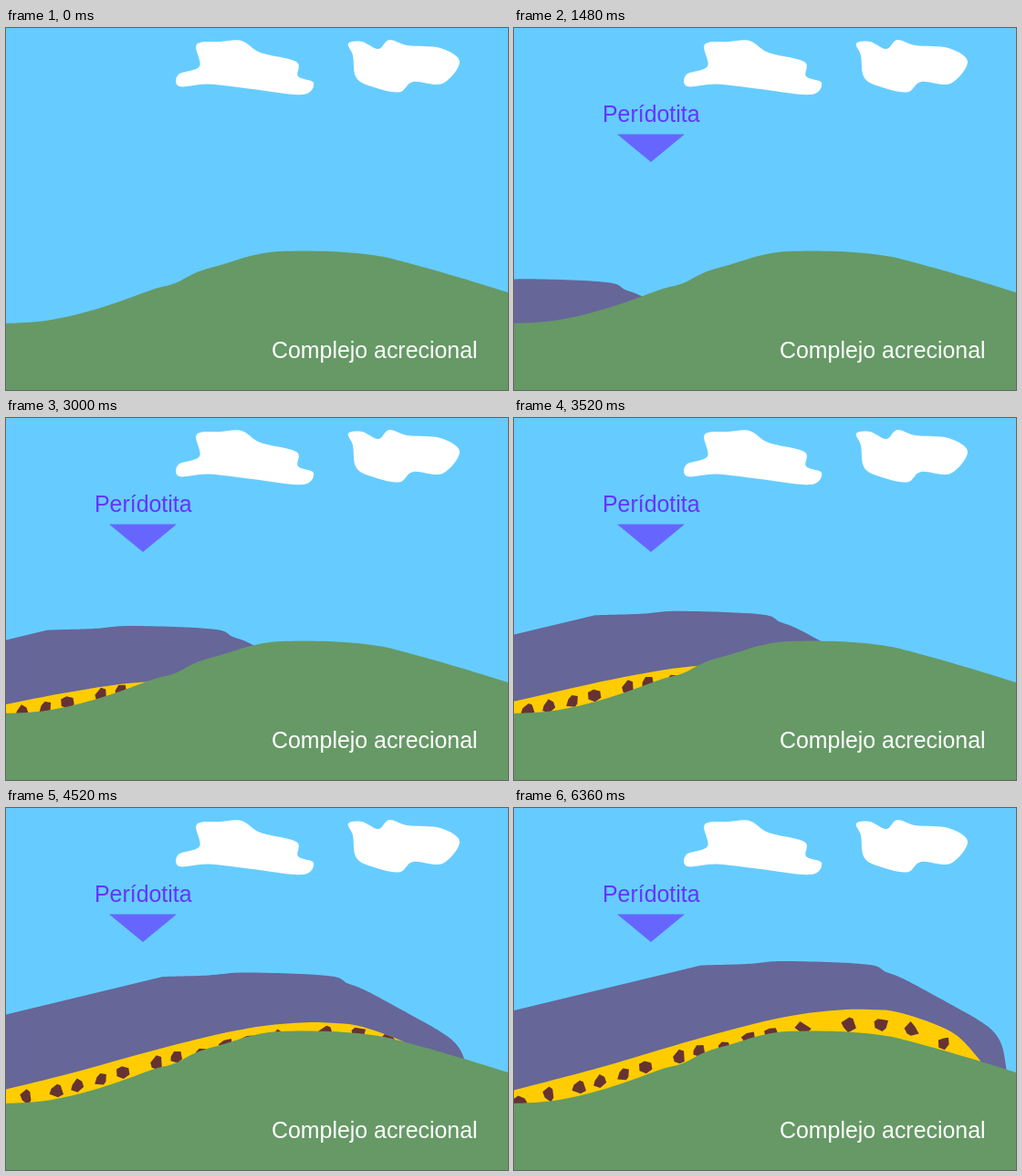
Recreate the animation shown at these times as an HTML page. Size 550 by 397 pixels, loop 6400 ms.

```html
<!DOCTYPE html>
<html lang="es">
<head>
<meta charset="utf-8">
<title>Complejo acrecional</title>
<style>
  html, body { margin: 0; width: 100%; height: 100%; overflow: hidden; background: #6cf; }
  svg { display: block; width: 100%; height: 100%; }
  text { font: 24.9px "Liberation Sans", Arial, sans-serif; }
</style>
</head>
<body>
<svg viewBox="0 0 550 397">
  <defs><clipPath id="clip"><path id="clipShape"/></clipPath></defs>
  <rect width="550" height="397" fill="#6cf"/>
  <path id="cloudA" fill="#fff"/>
  <path id="cloudB" fill="#fff"/>
  <g id="slab">
    <path id="mantle" fill="#669"/>
    <path id="melange" fill="#fc0"/>
    <g clip-path="url(#clip)"><path id="rocks" fill="#633"/></g>
    <path d="M113 116.5H187L150 147Z" fill="#66f"/>
    <text x="97" y="103" fill="#63f">Perídotita</text>
  </g>
  <path id="hill" fill="#696"/>
  <text x="291" y="362" fill="#fff">Complejo acrecional</text>
</svg>
<script>
const LOOP = 6400, STEP = 40, START = 200, END = 4920;
const $ = id => document.getElementById(id);
const setPath = (id, d) => $(id).setAttribute('d', d);
const move = (id, value) => $(id).setAttribute('transform', value);
const points = s => s.split(' ').map(p => p.split(',').map(Number));

// Catmull-Rom curve through the points
function smooth(p, closed) {
  const n = p.length;
  const at = i => closed ? p[(i + n) % n] : p[Math.max(0, Math.min(n - 1, i))];
  let d = 'M' + p[0];
  for (let i = 0; i < (closed ? n : n - 1); i++) {
    const [a, b, c, e] = [at(i - 1), at(i), at(i + 1), at(i + 2)];
    const c1 = b.map((v, k) => v + (c[k] - a[k]) / 6);
    const c2 = c.map((v, k) => v - (e[k] - b[k]) / 6);
    d += `C${c1} ${c2} ${c}`;
  }
  return d;
}

function heightAt(p, x) {
  const i = p.findIndex(q => q[0] > x);
  const [a, b] = [p[i - 1], p[i]];
  return a[1] + (b[1] - a[1]) * (x - a[0]) / (b[0] - a[0]);
}

let seed = 7;
const random = () => (seed = seed * 16807 % 2147483647) / 2147483647;

// Jagged lump around the origin
function lump() {
  const corners = [];
  for (let i = 0; i < 6; i++) {
    const angle = (i + random() * 0.6) * Math.PI / 3;
    const r = 5 + random() * 5;
    corners.push([r * Math.cos(angle), r * Math.sin(angle)]);
  }
  return corners;
}

setPath('cloudA', smooth(points('209,18 235,15 258,14 279,27 318,37 320,53 337,60 325,73 270,67 222,61.5 190,64 189,51 212,42'), true));
setPath('cloudB', smooth(points('375,17 390,15 408,23 420,13 440,19 476,22 497,37 478,61 446,59 430,70.5 397,63 383,53 380,30'), true));

const hill = points('0,324 40,321.5 80,313.5 120,301.5 160,287 185,280 210,267.5 240,258.5 270,249.5 300,245 355,245 405,249.5 440,257.5 500,274.5 550,290');
setPath('hill', smooth(hill) + 'V397H0Z');

const crest = points('205,172.5 255,171 298,168 386,171.5 408,180 430,189 487,220 511,234 526,246 535,262 540,290');
setPath('mantle', smooth(crest) + 'V400H0V222Z');

const arc = points('0,309.5 100,283 200,253.5 290,230.5 350,222 390,221 425,225 480,246 511,277');
const band = smooth(arc) + 'L470,400H0Z';
setPath('melange', band);
setPath('clipShape', band);

// Rocks lie at an even depth under the arc
const rocks = [5, 38, 72, 95, 121, 144, 181, 202, 230, 258, 282, 317, 367, 401, 435, 471]
  .map(x => ({ x, y: heightAt(arc, x) + 15, corners: lump() }));

function draw(ms) {
  const t = Math.floor(ms % LOOP / STEP) * STEP;
  const left = Math.max(0, END - t);
  const dx = -0.083 * left, dy = 0.0312 * left, skew = 4.9e-5 * left;
  $('slab').style.display = t < START ? 'none' : '';
  move('mantle', `translate(${dx} ${dy})`);
  const bend = `matrix(1 ${skew} 0 1 ${dx} ${dy - 280 * skew})`;
  move('melange', bend);
  move('clipShape', bend);
  setPath('rocks', rocks.map(({ x, y, corners }) => {
    const rx = x - 0.04 * left, ry = y + 0.0012 * Math.sqrt(x) * left;
    return 'M' + corners.map(c => [rx + c[0], ry + c[1]]).join('L') + 'Z';
  }).join(''));
}

const begin = performance.now();
function tick() {
  draw(performance.now() - begin);
  requestAnimationFrame(tick);
}
tick();
</script>
</body>
</html>
```
